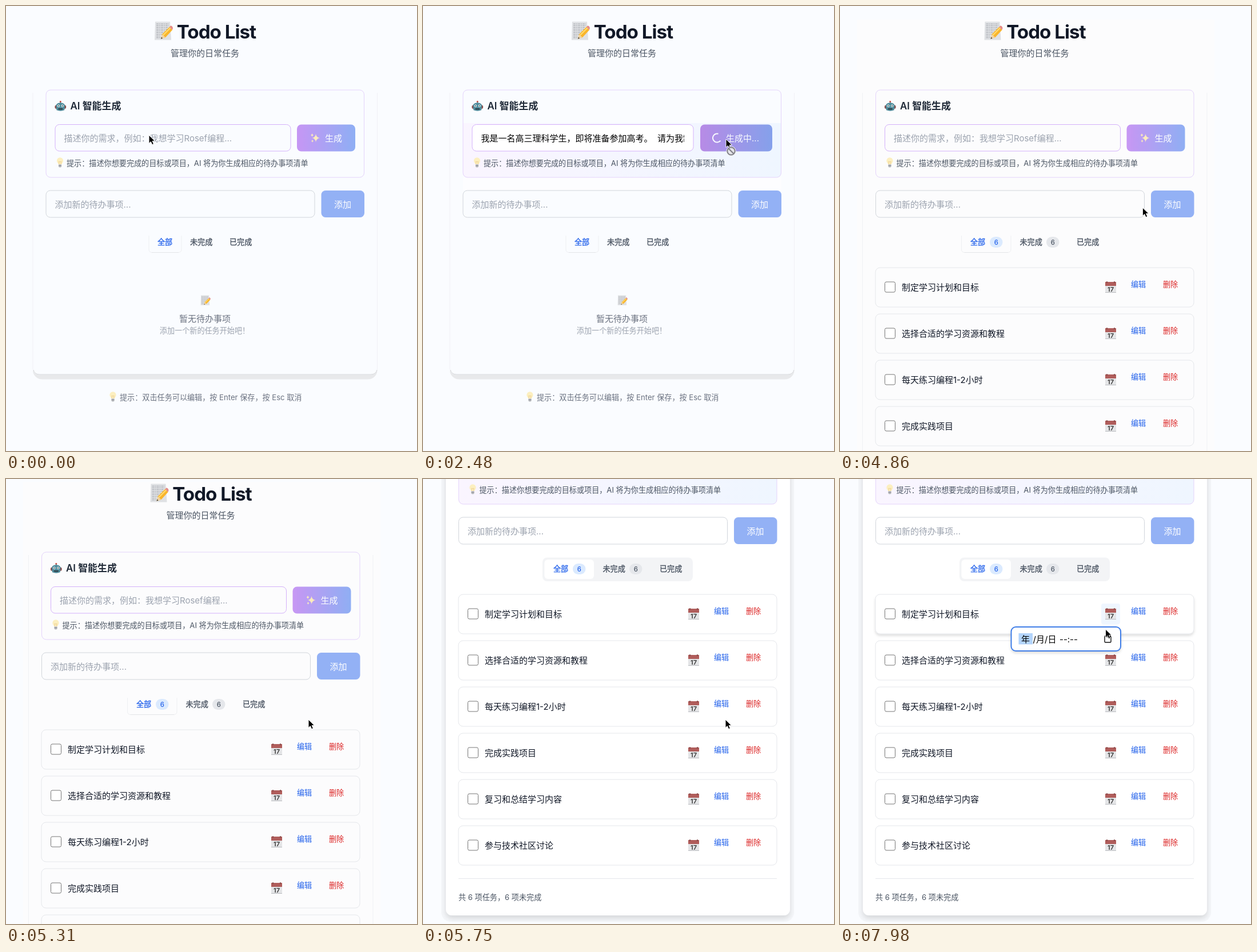
Animation of 719 by 779 pixels, one loop 8 s. Source, as an HTML page:

```html
<!DOCTYPE html>
<html lang="zh-CN">
<head>
<meta charset="utf-8">
<title>Todo List</title>
<style>
html, body { margin: 0; width: 100%; height: 100%; overflow: hidden; background: #fafcff; }
svg { display: block; width: 719px; height: 779px; font-family: Inter, "Noto Sans CJK SC", "Noto Sans CJK", sans-serif; }
text { white-space: pre; }
</style>
</head>
<body>
<svg id="stage" viewBox="0 0 719 779">
  <defs>
    <linearGradient id="soft"><stop stop-color="#faf5ff"/><stop offset="1" stop-color="#eff6ff"/></linearGradient>
    <linearGradient id="base"><stop stop-color="#9333ea"/><stop offset="1" stop-color="#2563eb"/></linearGradient>
    <linearGradient id="hover"><stop stop-color="#7e22ce"/><stop offset="1" stop-color="#1d4ed8"/></linearGradient>
    <clipPath id="field"><rect x="101" y="208" width="356" height="46"/></clipPath>
    <clipPath id="fieldWide"><rect x="101" y="208" width="381" height="46"/></clipPath>
    <filter id="lift" x="-10%" y="-20%" width="120%" height="160%">
      <feDropShadow dx="0" dy="3" stdDeviation="2" flood-opacity=".13"/>
    </filter>
    <filter id="cardLift" x="-5%" y="-5%" width="110%" height="110%">
      <feDropShadow dx="0" dy="5" stdDeviation="4" flood-opacity=".12"/>
    </filter>
    <g id="memo">
      <path d="M2 0H28L30 32H1Z" fill="#dfe1e4"/>
      <path d="M4 4H26M4 7H26M4 10H25M4 13H23M4 16H20M4 19H16M4 22H14M4 25H12M4 28H11" stroke="#a2a5ac" stroke-dasharray="4 1 2 1"/>
      <path d="M12 30l2-8L27 9l5 5.500-12 13z" fill="#f9b52b"/>
      <path d="M15.500 24L28.500 11" stroke="#ffdc72" stroke-width="2"/>
      <path d="M27 9l2-2q3 0 4 4l-1 3.500z" fill="#e58b87"/>
      <path d="M12 30l2-8 6 5.500z" fill="#f0d3a4"/>
      <path d="M12 30l1-3 2 2z" fill="#333"/>
    </g>
    <g id="robot">
      <circle cx="10" cy="2" r="1.500" fill="#c9483d"/>
      <path d="M10 3V6" stroke="#56727d" stroke-width="2"/>
      <rect y="8.500" width="20" height="6" rx="2" fill="#8d4a49"/>
      <path d="M2 10Q2 4 10 4T18 10L17 17Q10 20 3 17Z" fill="#4f8b9b"/>
      <circle cx="6.500" cy="9.500" r="2.300" fill="#d9f1f4"/><circle cx="13.500" cy="9.500" r="2.300" fill="#d9f1f4"/>
      <circle cx="6.500" cy="9.500" r="1" fill="#333"/><circle cx="13.500" cy="9.500" r="1" fill="#333"/>
      <rect x="6" y="13.800" width="8" height="2.600" rx="1" fill="#2f434c"/>
    </g>
    <g id="bulb">
      <path d="M3.500 11Q3 9 1.500 7.400A5.600 5.600 0 1 1 11.500 7.400Q10 9 9.500 11Z" fill="#fcefc0"/>
      <path d="M5 11L4.500 6 6.500 7 8.500 6 8 11" fill="none" stroke="#ebc987" stroke-width=".8"/>
      <path d="M4 11.500H9V15.500Q6.500 17.500 4 15.500Z" fill="#b3b5ba"/>
      <path d="M4 13H9" stroke="#8a8c92"/>
    </g>
    <g id="spark" fill="#fbd97f">
      <path d="M10 2Q10.800 8 17 9 10.800 10 10 16.500 9.200 10 3.500 9 9.200 8 10 2Z"/>
      <path d="M3.500 1Q4 3.500 6 4 4 4.500 3.500 7 3 4.500 1 4 3 3.500 3.500 1ZM4 12Q4.400 14 6 14.300 4.400 14.700 4 17 3.600 14.700 2 14.300 3.600 14 4 12Z"/>
    </g>
    <g id="calendar">
      <rect y="1" width="19" height="19" fill="#e4e5e7"/>
      <rect y="1" width="19" height="7" fill="#b05d5b"/>
      <path d="M3 0V3M16 0V3" stroke="#7f4545" stroke-width="1.500"/>
      <path d="M0 19.500H19" stroke="#b9bbbf"/>
      <text x="9.500" y="18" font-size="11" font-weight="600" text-anchor="middle" fill="#333">17</text>
    </g>
    <path id="arrow" d="M0 0V14.500L3.400 11.500 5.700 16.700 8.400 15.500 6.100 10.400H10.600Z" fill="#000" stroke="#fff"/>
    <path id="hand" d="M0 1.500Q0-1 1.800-1T3.500 1.500V6L9.500 7.200Q12 7.800 11.500 11L10.500 15.500H2.500L-2.500 9.500Q-3.500 7.500-1.500 7.500L0 9Z" fill="#000" stroke="#fff"/>
    <g id="ban">
      <circle r="8.500" fill="#fff"/>
      <circle r="6.700" fill="#e6e6ea" stroke="#85858d" stroke-width="2.200"/>
      <path d="M-4.500-4.500L4.500 4.500" stroke="#85858d" stroke-width="2.200"/>
    </g>
  </defs>
  <g id="scene"></g>
</svg>
<script>
const LOOP = 8000;
const FOCUS = 450, PASTE = 1170, SEND = 2220, DONE = 3720, RICH = 5390;
const BG = '#fafcff', GRAY = '#4b5563', PALE = '#9ca3af', INK = '#111827', BLUE = '#2563eb';
const TASKS = ['制定学习计划和目标', '选择合适的学习资源和教程', '每天练习编程1-2小时',
  '完成实践项目', '复习和总结学习内容', '参与技术社区讨论'];
// Wheel scrolling: [time, offset]
const SCROLL = [[0, 0], [5310, 19], [5390, 80], [5480, 130], [5570, 171], [5660, 222], [5750, 256]];
// Pointer legs: [start, end, from x, from y, to x, to y]
const LEGS = [[1170, 1900, 250, 226, 530, 233], [4600, 5040, 530, 233, 529, 421],
  [6820, 7440, 529, 421, 471, 240], [7979, 7980, 471, 240, 464.5, 263]];

const scene = document.getElementById('scene');
const clamp = v => Math.max(0, Math.min(1, v));
const ease = v => v * v * (3 - 2 * v);

const rect = (x, y, w, h, r, fill, more = '') =>
  `<rect x="${x}" y="${y}" width="${w}" height="${h}" rx="${r}" fill="${fill}" ${more}/>`;
// Text is placed by the vertical centre of its glyphs.
const text = (s, x, cy, size, fill, more = '') =>
  `<text x="${x}" y="${cy + size * 0.37}" font-size="${size}" fill="${fill}" ${more}>${s}</text>`;
const use = (id, x, y, scale = 1) => `<use href="#${id}" transform="translate(${x} ${y}) scale(${scale})"/>`;
const stroke = (c, w = 1) => `stroke="${c}" stroke-width="${w}"`;
const MID = 'text-anchor="middle"';

function pointer(t) {
  let x = 250, y = 226;
  for (const [a, b, x0, y0, x1, y1] of LEGS) {
    if (t < a) break;
    const k = ease(clamp((t - a) / (b - a)));
    x = x0 + (x1 - x0) * k;
    y = y0 + (y1 - y0) * k;
  }
  return { x, y };
}

function card(s) {
  if (s.rich) return rect(39.5, 117, 617, 914, 16, '#f4f6f9') +
    rect(47.5, 123, 602, 897, 11, '#fff', 'filter="url(#cardLift)"');
  const end = s.list ? 1000 : 636;
  const sides = `<path d="M47 152V${end}M649.5 152V${end}" stroke="#f0f1f5"/>`;
  if (s.list) return rect(37, 24, 626, 980, 0, '#fcfcfd') + sides;
  return rect(47, 600, 602.5, 53.5, 16, '#e8e9eb') + rect(46, 590, 605, 40, 0, BG) +
    rect(47, 600, 602.5, 45.5, 11, BG) +
    '<path d="M48 637Q50 645 59 645H638Q647 645 649 637" fill="none" stroke="#d5d7da"/>' + sides;
}

function generateButton(s, t) {
  const x = s.busy ? 485 : 509;
  const on = clamp((t - PASTE) / 200) * (1 - clamp((t - SEND) / 200));
  let out = rect(x, 207.5, 611 - x, 47, 7.5, `url(#${s.overButton ? 'hover' : 'base'})`);
  if (s.busy) {
    const turn = (t - 2480) * 0.36;
    out += `<path d="M6 4.500A7.500 7.500 0 1 1 2-7.200" transform="translate(514.500 231) rotate(${turn})" fill="none" ${stroke('#fff', 2)}/>` +
      text('生成中...', 530, 231, 15, '#fff');
  } else {
    out += use('spark', 532, 222) + text('生成', 558, 231, 15, '#fff');
  }
  return `<g opacity="${0.5 + on / 2}">${out}</g>`;
}

function panel(s, t) {
  const width = s.busy ? 387 : 412;
  const focused = t >= FOCUS && t < SEND;
  const filled = t >= PASTE && t < DONE;
  const active = t >= FOCUS && !s.list;
  let out = '';
  if (s.rich) out += rect(70, 147, 556.5, 153, 8, 'url(#soft)');
  else if (active)
    out += rect(70, 300, 556.5, 22, 0, '#fdfdff') +
      '<path d="M70 205H626.5V292Q626.5 300 618.5 300H78Q70 300 70 292Z" fill="url(#soft)"/>';
  out += rect(70, 147, 556.5, 153, 8, 'none', stroke('#e4d3fb')) +
    use('robot', 85.5, 165.5, 0.98) + text('AI 智能生成', 112.5, 175, 16.9, '#1f2937', 'font-weight="600"') +
    rect(86, 207.5, width, 46.5, 7.5, s.rich || active ? '#fff' : s.bg,
      focused ? stroke('#a855f7', 2.5) : stroke('#d4b1fa'));
  if (filled) out += `<g clip-path="url(#${s.busy ? 'field' : 'fieldWide'})">` +
    text('我是一名高三理科学生，即将准备参加高考。  请为我制定学习计划', 101.5, 231, 15, '#000') + '</g>';
  else out += text('描述你的需求，例如：我想学习Rosef编程...', 101.5, 231, 15, PALE);
  if (t >= FOCUS && t < 990) out += rect(102, 222, 1, 17, 0, '#000');
  return out + generateButton(s, t) + use('bulb', 88, 266) +
    text('提示：描述你想要完成的目标或项目，AI 将为你生成相应的待办事项清单', 106, 275, 13.125, GRAY);
}

function tabs(s) {
  const [x, w, all, open, done] = s.list ? [220, 86.5, 235.5, 322, 421.5] : [250, 57, 265, 322, 391];
  // A hairline outline stands in for the medium weight.
  const label = (name, lx, ink) => text(name, lx, 413.5, 13.125, ink, stroke(ink, 0.35));
  const badge = (bx, fill, ink) => rect(bx, 404, 22.5, 19, 9.5, fill) + text('6', bx + 11.2, 413.5, 11.3, ink, MID + ' font-weight="500"');
  let out = s.rich ? rect(216.5, 393.5, 263, 41.5, 8, '#f3f4f6') + rect(x, 397, w, 34, 6, '#fff') :
    `<path d="M${x} 402V426Q${x} 431.500 ${x + 6} 431.500H${x + w - 6}Q${x + w} 431.500 ${x + w} 426V402" fill="none" stroke="#eeeff2"/>` +
    `<path d="M${x + 5} 431.500H${x + w - 5}" stroke="#e3e5e8"/>`;
  out += label('全部', all, BLUE) + label('未完成', open, GRAY) + label('已完成', done, GRAY);
  if (s.list) out += badge(269.5, '#dbeafe', BLUE) + badge(368.5, '#e5e7eb', GRAY);
  return out;
}

function row(name, i, s) {
  const y = 458 + 81 * i;
  return rect(69.5, y, 557, 69, 8, s.rich ? '#fff' : s.bg,
      stroke('#e5e7eb') + (s.hoverRow === i ? ' filter="url(#lift)"' : '')) +
    (i === 0 && s.overDate ? rect(464.5, y + 16, 33, 36.5, 4, '#eff6ff') : '') +
    rect(86, y + 25, 18, 18, 2.5, '#fff', stroke('#767676')) +
    text(name, 115.5, y + 34.5, 15, INK) + use('calendar', 471.5, y + 24) +
    text('编辑', 516.5, y + 29, 13.125, BLUE) + text('删除', 572.5, y + 29, 13.125, '#dc2626');
}

function page(s, t) {
  let out = card(s) + use('memo', 259, 27.5) +
    text('Todo List', 368, 45, 33.2, INK, MID + ' font-weight="700" letter-spacing="-1"') +
    text('管理你的日常任务', 348, 82, 15, GRAY, MID) + panel(s, t) +
    rect(70, 323, 470, 47, 7.5, s.rich ? '#fff' : s.bg, stroke('#d1d5db')) +
    text('添加新的待办事项...', 85.5, 347, 15, PALE) +
    rect(551.5, 323, 75.5, 47, 7.5, '#93b1f5') + text('添加', 589, 347, 15, '#fff', MID) + tabs(s);
  if (s.list) out += TASKS.map((name, i) => row(name, i, s)).join('') +
    '<path d="M69.500 955.500H626.500" stroke="#e5e7eb"/>' + text('共 6 项任务，6 项未完成', 69.5, 988, 13.125, GRAY);
  else out += use('memo', 340, 506.5, 0.54) + text('暂无待办事项', 348, 547.5, 15, '#6b7280', MID) +
    text('添加一个新的任务开始吧！', 347.5, 568, 13.125, PALE, MID) + use('bulb', 180.5, 676) +
    text('提示：双击任务可以编辑，按 Enter 保存，按 Esc 取消', 199, 685, 13.125, '#6b7280');
  return out;
}

function datePopup() {
  return rect(299.5, 259, 191.5, 42, 8, '#fff', stroke('#3f7ee8', 2) + ' filter="url(#lift)"') +
    rect(312.5, 270, 24.5, 19.5, 0, '#b3d4fb') +
    [['年', 317], ['/', 337.5], ['月', 343], ['/', 358], ['日', 363.5], ['--:--', 384]]
      .map(([c, x]) => text(c, x, 280, 15, '#000')).join('') +
    rect(463, 275.5, 11, 10.5, 1.5, 'none', stroke('#111', 1.4)) + rect(463, 274, 11, 3, 0, '#111');
}

function cursor(s, t, { x, y }) {
  if (t >= FOCUS && t < SEND && !s.overButton)
    return `<path d="M${x - 3} ${y - 3}q3 0 3 3q0-3 3-3M${x} ${y}v12M${x - 3} ${y + 15}q3 0 3-3q0 3 3 3" fill="none" stroke="#222"/>`;
  if (s.overButton && t < SEND || s.overDate && t < 7980) return use('hand', x, y);
  return use('arrow', x, y) + (s.overButton ? use('ban', x + 9, y + 21) : '');
}

function draw(t) {
  const p = pointer(t);
  const list = t >= DONE, rich = t >= RICH, busy = t >= SEND && !list;
  const scroll = SCROLL.filter(k => k[0] <= t).pop()[1];
  const left = busy ? 485 : list ? 501.5 : 509;
  const s = {
    list, rich, busy,
    bg: list ? '#fcfcfd' : BG,
    overButton: p.x > left && p.y < 254 && t < 5100,
    overDate: t > 6820 && p.x < 490 && p.y < 265,
    hoverRow: t >= 6560 ? Math.floor((p.y - 202) / 81) : -1
  };
  return `<g transform="translate(${list ? -7.5 : 0} ${-scroll})">${page(s, t)}</g>` +
    (t >= 7620 ? datePopup() : '') + cursor(s, t, p);
}

let last = '';
function tick(now) {
  const markup = draw(now % LOOP);
  if (markup !== last) scene.innerHTML = last = markup;
  requestAnimationFrame(tick);
}
requestAnimationFrame(tick);
</script>
</body>
</html>
```
